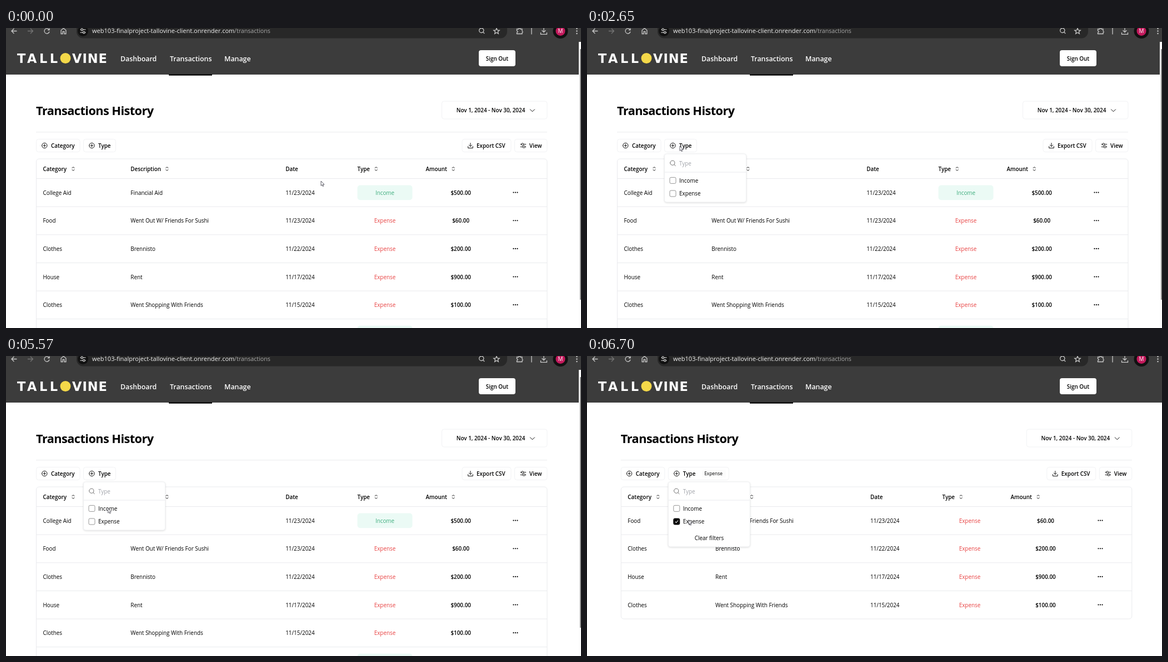
Write an HTML page that moves like this. It is 1035x541 px and loops after 8000 ms.

```html
<!DOCTYPE html>
<html lang="en">
<head>
<meta charset="utf-8">
<title>Transactions History</title>
<style>
html, body { margin: 0; width: 100%; height: 100%; overflow: hidden; background: #fff; }
svg { display: block; width: 100%; height: 100%; }
text { font: 400 9.9px "Open Sans", "Noto Sans", sans-serif; fill: #000; }
.b { font-weight: 600; }
.mid { text-anchor: middle; }
.h1 { font-size: 21.7px; font-weight: 700; letter-spacing: -.025em; }
.nav { font-size: 12.35px; font-weight: 600; fill: #fff; }
.logo { font: 700 22.5px "DejaVu Sans", sans-serif; fill: #fff; }
.url { font-size: 11.04px; fill: #f1f1f1; }
.path { font-size: 10.65px; fill: #a9a9a9; }
.initial { fill: #fff; }
.in { fill: #3fae7e; }
.ex { fill: #e84242; }
.hint { fill: #a0a3a9; }
.tag { font-size: 8.4px; }
.line { fill: none; stroke: #e9eaed; }
.box { fill: #fff; stroke: #f1f2f4; }
.ico { fill: none; stroke: #111; stroke-width: 1; stroke-linecap: round; stroke-linejoin: round; }
.chrome { fill: none; stroke: #c9c9c9; stroke-width: 1.3; }
.pop { fill: #fff; stroke: #eeeff1; filter: drop-shadow(0 1.5px 1.5px rgba(0,0,0,.13)); }

#all, #income, #expense, #all .menu, #cursor { animation: 8s step-end infinite; }
#all { animation-name: all; }
#income { animation-name: income; }
#expense { animation-name: expense; }
#all .menu { animation-name: menu; }
#cursor { animation-name: cursor; }

@keyframes all { 0% { opacity: 1 } 46.75% { opacity: 0 } 69.625% { opacity: 1 } 83.75%, 100% { opacity: 0 } }
@keyframes income { 0% { opacity: 0 } 46.75% { opacity: 1 } 69.625%, 100% { opacity: 0 } }
@keyframes expense { 0% { opacity: 0 } 83.75%, 100% { opacity: 1 } }
@keyframes menu { 0% { opacity: 0 } 33.125%, 100% { opacity: 1 } }
@keyframes cursor {
  0% { transform: translate(567px, 276px) }
  15.625% { transform: translate(482px, 234px) }
  17.125% { transform: translate(366px, 192px) }
  18.625% { transform: translate(296px, 186px) }
  20.125% { transform: translate(260.5px, 196px) }
  23.25% { transform: translate(250.5px, 199.5px) }
  24.75% { transform: translate(218px, 206px) }
  26.25% { transform: translate(182px, 212px) }
  27.75% { transform: translate(164.5px, 213px) }
  29.625% { transform: translate(167px, 213px) }
  36.125% { transform: translate(168px, 221px) }
  37.625% { transform: translate(172px, 239px) }
  39.125% { transform: translate(177px, 256px) }
  40.625% { transform: translate(181px, 268px) }
  42.125% { transform: translate(183.5px, 274.5px) }
  72.75% { transform: translate(183.5px, 277px) }
  74.25% { transform: translate(183px, 283px) }
  75.75% { transform: translate(183px, 289px) }
  77.25% { transform: translate(183px, 293.5px) }
  78.75%, 100% { transform: translate(183px, 295.5px) }
}
</style>
</head>
<body>
<svg id="stage" viewBox="0 0 1035 541" preserveAspectRatio="none"></svg>
<script>
const ROWS = [
  ["College Aid", "Financial Aid", "11/23/2024", "Income", "$500.00"],
  ["Food", "Went Out W/ Friends For Sushi", "11/23/2024", "Expense", "$60.00"],
  ["Clothes", "Brennisto", "11/22/2024", "Expense", "$200.00"],
  ["House", "Rent", "11/17/2024", "Expense", "$900.00"],
  ["Clothes", "Went Shopping With Friends", "11/15/2024", "Expense", "$100.00"],
  ["Freelance", "Coding Job", "11/14/2024", "Income", "$2000.00"],
  ["College Aid", "Work Study", "11/11/2024", "Income", "$500.00"]
];
const ROW_H = 50.65, TOP = 271.5;

const text = (x, y, s, cls = "") => `<text x="${x}" y="${y}" class="${cls}">${s}</text>`;
const rect = (x, y, w, h, r, attrs) =>
  `<rect x="${x}" y="${y}" width="${w}" height="${h}" rx="${r}" ${attrs}/>`;
const icon = (x, y, d, cls = "ico") => `<path transform="translate(${x} ${y})" d="${d}" class="${cls}"/>`;
const hline = (x, y, w) => `<path d="M${x} ${y}h${w}" class="line"/>`;
const ring = r => `M${-r} 0a${r} ${r} 0 1 0 ${2 * r} 0a${r} ${r} 0 1 0 ${-2 * r} 0`;

const PLUS = ring(4.7) + "M-2.3 0h4.6M0-2.3v4.6";
const SORT = "M-2-1.4 0-3.4 2-1.4M-2 1.4 0 3.4 2 1.4";
const LOAD = "M-4.3 1.5v3h8.6v-3M0-4.5v6M-2.6-1 0 1.6 2.6-1";
const SLIDERS = "M-4.8-2.3h1.6M.6-2.3h4.2M-4.8 2.3h4.2M3.2 2.3h1.6M-3.2-2.3a1.9 1.9 0 1 0 3.8 0a1.9 1.9 0 1 0-3.8 0M-.6 2.3a1.9 1.9 0 1 0 3.8 0a1.9 1.9 0 1 0-3.8 0";
const FIND = "M-4.8-.6a4.1 4.1 0 1 0 8.2 0a4.1 4.1 0 1 0-8.2 0M2.2 2.4 4.8 5";

function browser() {
  const c = (x, y, d) => icon(x, y, d, "chrome");
  return rect(0, 0, 1035, 84, 0, 'fill="#3c3c3c"') +
    rect(127, -14, 775, 32.5, 12, 'fill="#282828"') +
    c(14.5, 5.5, "M5 0H-4M0-4.5-4.5 0 0 4.5") +
    `<g opacity=".4">${c(44, 5.5, "M-5 0H4M0-4.5 4.5 0 0 4.5")}</g>` +
    c(73.5, 5.5, "M4-2.5A4.6 4.6 0 1 0 4.6 1M4.6-5v3.2H1.4") +
    c(103.5, 5.5, "M-4.4 5v-6.5L0-5l4.4 3.5V5h-3V1h-2.8v4z") +
    '<circle cx="138.5" cy="5.5" r="9.5" fill="#111"/>' +
    c(138.5, 5.5, "M-5-2.6h1.4M.4-2.6h4.6M-5 2.6h4.4M3.6 2.6H5M-3.6-2.6a1.8 1.8 0 1 0 3.6 0a1.8 1.8 0 1 0-3.6 0M0 2.6a1.8 1.8 0 1 0 3.6 0a1.8 1.8 0 1 0-3.6 0") +
    text(155, 9.2, "web103-finalproject-tallovine-client.onrender.com", "url") +
    text(411, 9.2, "/transactions", "path") +
    c(856.5, 5, FIND) +
    c(883, 5.5, "M0-5 1.5-1.6 5.2-1.3 2.4 1.1 3.3 4.8 0 2.8-3.3 4.8-2.4 1.1-5.2-1.3-1.5-1.6z") +
    c(924.5, 5.5, "M-5-3.5h3.2a1.7 1.7 0 0 1 3.4 0H4.5V0a1.7 1.7 0 0 1 0 3.2V5H-5V2.8a1.6 1.6 0 0 0 0-3.2z") +
    c(946, 5.5, "M0-6V6") +
    c(968, 6, "M-5.5 2v3.4h11V2M0-6v7.5M-3.4-1.8 0 1.6 3.4-1.8") +
    '<circle cx="998" cy="5.5" r="13.5" fill="#111"/><circle cx="998" cy="5.5" r="8.5" fill="#c2185b"/>' +
    text(998, 9, "M", "initial mid") +
    [1, 5.5, 10].map(y => `<circle cx="1027.5" cy="${y}" r="1.2" fill="#c9c9c9"/>`).join("");
}

function header() {
  return '<g letter-spacing="4.5">' + text(20, 63, "TALL", "logo") + "</g>" +
    '<circle cx="107" cy="54.5" r="9.5" fill="#f4d849"/>' +
    '<g letter-spacing="1">' + text(119, 63, "VINE", "logo") + "</g>" +
    text(206, 59.6, "Dashboard", "nav") + text(295, 59.6, "Transactions", "nav") +
    text(393, 59.6, "Manage", "nav") +
    rect(293, 83.5, 78, 2.2, 0, 'fill="#000"') +
    rect(851, 40, 66, 29, 4, 'fill="#fff"') +
    text(884, 58.8, "Sign Out", "b mid");
}

function toolbar(filter) {
  const typeW = { Income: 105.5, Expense: 109 }[filter] || 58;
  const btn = (x, y, w, h) => rect(x, y, w, h, 4, 'class="box"');
  return text(54, 157, "Transactions History", "h1") +
    btn(784.5, 132, 189.5, 32) + text(872.5, 152.3, "Nov 1, 2024 - Nov 30, 2024", "b mid") +
    icon(947.5, 148.8, "M-4-2 0 2 4-2") +
    hline(54, 187.8, 920) +
    btn(54.5, 200.5, 78.5, 23) + icon(69.3, 212, PLUS) + text(81, 215.8, "Category", "b") +
    btn(139.5, 200.5, typeW, 23) + icon(154.5, 212, PLUS) + text(166, 215.8, "Type", "b") +
    (filter ? rect(200, 205, typeW - 66, 14, 3, 'fill="#fcfcfc"') + text(204.4, 215, filter, "tag") : "") +
    btn(821, 200.5, 88, 23) + icon(836, 212, LOAD) + text(847, 215.8, "Export CSV", "b") +
    btn(915.5, 200.5, 58.5, 23) + icon(931, 212, SLIDERS) + text(942, 215.8, "View", "b");
}

// columns: x of description, date, type, badge width, amount heading, amount centre, dots
function table([desc, date, type, badgeW, amount, sum, dots], rows, dx) {
  const cat = 66.5 + dx, mid = type + badgeW / 2;
  const head = (x, s, gap) => text(x, 257.8, s, "b") + (gap ? icon(x + gap, 254, SORT) : "");
  let out = rect(54.5 + dx, 236, 919.5, TOP - 236 + ROW_H * rows.length, 5, 'class="line"') +
    hline(54.5 + dx, TOP, 919.5) +
    head(cat, "Category", 54.5) + head(desc, "Description", 65.5) + head(date, "Date") +
    head(type, "Type", 33.7) + head(amount, "Amount", 49.7);
  rows.forEach(([c, d, when, kind, money], i) => {
    const y = 297 + i * ROW_H, base = y + 3.7, earned = kind === "Income";
    if (i) out += hline(54.5 + dx, TOP + i * ROW_H, 919.5);
    if (earned) out += rect(type, y - 13.4, badgeW, 26.6, 5, 'fill="#ebfaf5"');
    out += text(cat, base, c) + text(desc, base, d) + text(date, base, when) +
      text(mid, base, kind, earned ? "in mid" : "ex mid") + text(sum, base, money, "b mid");
    for (const k of [-3.5, 0, 3.5])
      out += `<circle cx="${dots + k}" cy="${y - .4}" r="1.1"/>`;
  });
  return out;
}

function menu(filter) {
  const option = (s, y) => {
    const on = s === filter;
    return rect(149, y - 5.6, 11, 11, 2.2, `fill="${on ? "#000" : "#fff"}" stroke="${on ? "#000" : "#8a8a8a"}" stroke-width=".9"`) +
      (on ? `<path d="M152 ${y}l1.8 1.9 3.5-4" fill="none" stroke="#fff" stroke-width="1.1"/>` : "") +
      text(166, y + 3.8, s);
  };
  return '<g class="menu">' + rect(139.5, 227, 147, filter ? 117 : 87, 4, 'class="pop"') +
    `<g opacity=".6">${icon(154.5, 243.8, FIND)}</g>` + text(166, 247.6, "Type", "hint") +
    hline(140, 260, 146) + option("Income", 275) + option("Expense", 298.6) +
    (filter ? text(213.2, 332.4, "Clear filters", "mid") : "") + "</g>";
}

function scene(id, cols, filter) {
  const dx = filter ? 6.8 : 0;
  const rows = ROWS.filter(r => !filter || r[3] === filter);
  const shift = s => `<g transform="translate(${dx} 0)">${s}</g>`;
  const bar = filter ? "" : rect(1031, 25, 4, 516, 0, 'fill="#fcfcfc"') + rect(1033, 38, 2, 452, 0, 'fill="#8c8c8c"');
  return `<g id="${id}">` + shift(toolbar(filter)) + table(cols, rows, dx) + shift(menu(filter)) + bar + "</g>";
}

document.getElementById("stage").innerHTML =
  browser() + header() +
  scene("all", [224.3, 503.2, 632.5, 99, 755.5, 818.7, 917]) +
  scene("income", [251, 449.6, 595.5, 114.5, 733.5, 806, 913.5], "Income") +
  scene("expense", [231, 510, 639.5, 99, 762.5, 825.5, 924], "Expense") +
  '<path id="cursor" d="M0 0V8.4L1.9 6.7 3.3 9.7 4.6 9.1 3.3 6.2H5.9Z" fill="#fff" stroke="#4a4a55" stroke-width=".9"/>';
</script>
</body>
</html>
```
